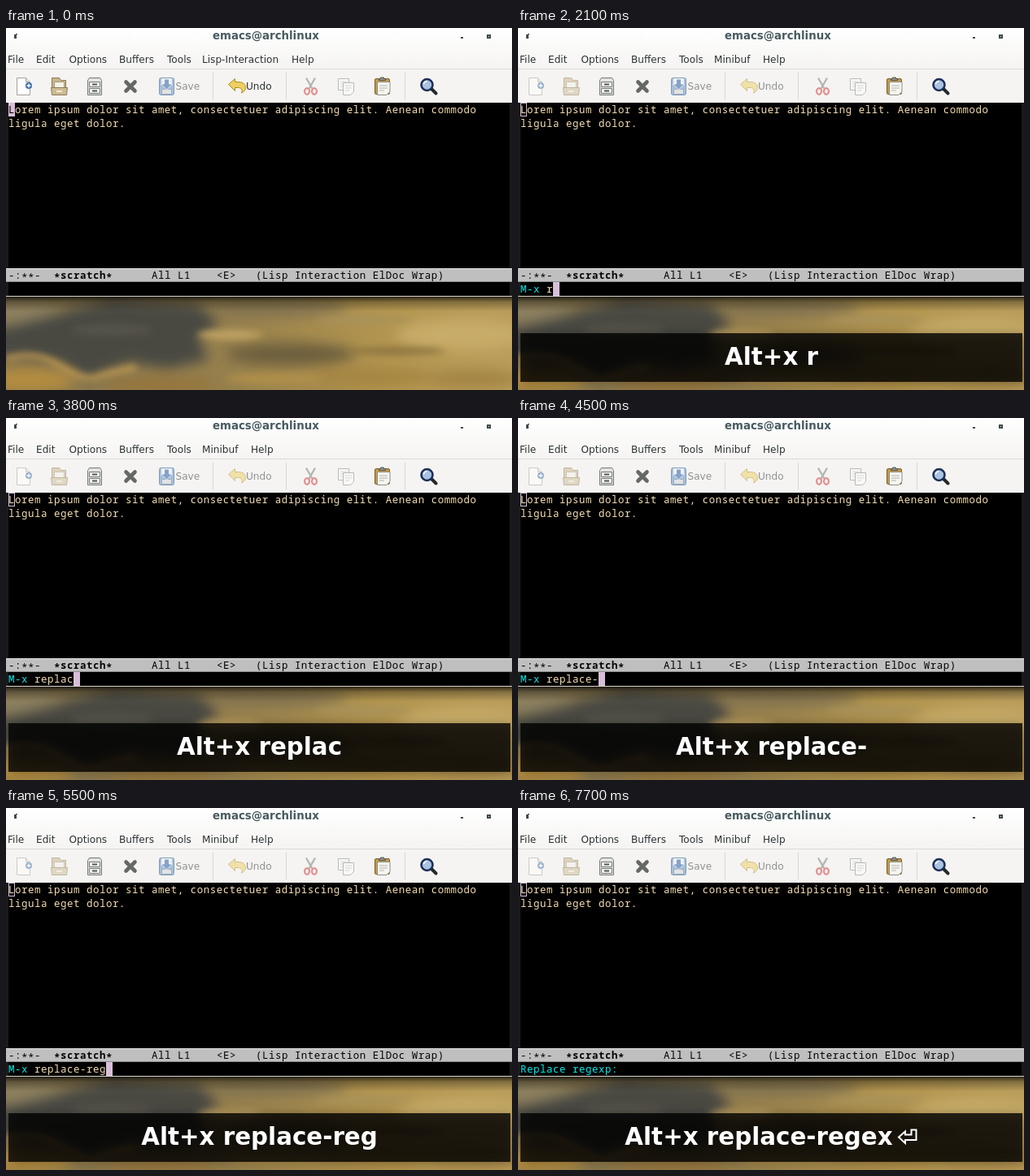
Animation of 622 by 446 pixels, one loop 8 s. Source, as an HTML page:

```html
<!DOCTYPE html>
<html lang="en">
<head>
<meta charset="utf-8">
<title>Replace regexp</title>
<style>
html, body { margin: 0; width: 100%; height: 100%; overflow: hidden; background: #000; }
svg { display: block; width: 622px; height: 446px; }
text { white-space: pre; }
.title { font: bold 13.333px "DejaVu Sans", sans-serif; fill: #465b60; }
.ui { font: 12.1px "DejaVu Sans", sans-serif; fill: #2b3133; }
.mono { font: 12.4px "Noto Sans Mono", monospace; letter-spacing: .56px; fill: #f5deb3; }
.mode { fill: #000; }
.bold { font-weight: bold; }
.prompt { fill: #0ee; }
.big { font: bold 29.333px "DejaVu Sans", sans-serif; fill: #fff; }
.off { opacity: .5; }
.busy .dim { opacity: .5; }
.busy .idle, svg:not(.busy) .live { display: none; }
</style>
</head>
<body>
<svg id="stage" viewBox="0 0 622 446">
  <defs>
    <linearGradient id="bar" x2="0" y2="1">
      <stop offset="0" stop-color="#fff"/><stop offset="1" stop-color="#f5f4f2"/>
    </linearGradient>
    <linearGradient id="dusk">
      <stop offset="0" stop-color="#85744e"/><stop offset=".45" stop-color="#96804d"/>
      <stop offset=".75" stop-color="#b3954f"/><stop offset="1" stop-color="#b99d5a"/>
    </linearGradient>
    <linearGradient id="shade" x2="0" y2="1">
      <stop offset="0" stop-color="#000" stop-opacity=".75"/>
      <stop offset=".35" stop-color="#000" stop-opacity=".3"/>
      <stop offset="1" stop-color="#000" stop-opacity="0"/>
    </linearGradient>
    <filter id="soft" x="-30%" y="-60%" width="160%" height="220%"><feGaussianBlur stdDeviation="8"/></filter>
    <filter id="wisp" x="-30%" y="-80%" width="160%" height="260%"><feGaussianBlur stdDeviation="4"/></filter>
    <clipPath id="view"><rect y="331" width="622" height="115"/></clipPath>
  </defs>

  <!-- sky -->
  <g clip-path="url(#view)">
    <rect y="331" width="622" height="115" fill="url(#dusk)"/>
    <g filter="url(#soft)">
      <ellipse cx="20" cy="352" rx="50" ry="12" fill="#8d8160"/>
      <path d="M-20 372L60 352L130 334L240 340L262 366L236 384L250 408L200 420L150 412L100 432L66 412L-20 404Z" fill="#4a4843"/>
      <ellipse cx="25" cy="434" rx="60" ry="16" fill="#b28c41"/>
      <ellipse cx="190" cy="440" rx="70" ry="9" fill="#96743a"/>
      <ellipse cx="350" cy="402" rx="80" ry="14" fill="#6d5e3d"/>
      <ellipse cx="330" cy="346" rx="90" ry="10" fill="#807150"/>
      <ellipse cx="450" cy="430" rx="80" ry="10" fill="#a58440"/>
      <ellipse cx="560" cy="378" rx="80" ry="20" fill="#c7ab68"/>
      <ellipse cx="575" cy="432" rx="60" ry="10" fill="#a18242"/>
    </g>
    <g filter="url(#wisp)">
      <path d="M0 408Q36 396 66 416T112 430T160 418" fill="none" stroke="#c29d52" stroke-width="6"/>
      <ellipse cx="275" cy="378" rx="40" ry="6" fill="#c0a262"/>
      <ellipse cx="440" cy="360" rx="60" ry="5" fill="#a8925a"/>
      <ellipse cx="330" cy="432" rx="60" ry="6" fill="#b18f48"/>
      <ellipse cx="480" cy="398" rx="60" ry="5" fill="#8d743f"/>
      <ellipse cx="130" cy="372" rx="50" ry="7" fill="#55524a"/>
    </g>
    <rect y="331" width="622" height="18" fill="url(#shade)"/>
  </g>

  <!-- window -->
  <rect width="622" height="92" fill="#f5f4f2"/>
  <rect width="622" height="50" fill="url(#bar)"/>
  <rect y="50" width="622" height="1" fill="#dddad6"/>
  <path d="M10 8h3v5h-3zM12 7h2v1h-2zM559 11h3v2h-3zM591 8h5v5h-5z" fill="#3c4a4d"/>
  <rect x="593" y="10" width="1" height="1" fill="#fff"/>
  <text class="title" x="254" y="14">emacs@archlinux</text>
  <g class="ui">
    <text x="2" y="43">File</text>
    <text x="37" y="43">Edit</text>
    <text x="77.5" y="43">Options</text>
    <text x="139" y="43">Buffers</text>
    <text x="198" y="43">Tools</text>
    <g class="idle"><text x="241" y="43">Lisp-Interaction</text><text x="351" y="43">Help</text></g>
    <g class="live"><text x="241" y="43">Minibuf</text><text x="301" y="43">Help</text></g>
    <text class="off" x="208.5" y="76">Save</text>
    <text class="dim" x="295" y="76">Undo</text>
  </g>
  <path d="M254.5 55v33M344.5 55v33M490.5 55v33" stroke="#d9d6d2"/>

  <!-- new -->
  <g class="dim">
    <path d="M13.5 61.5h11l5 5v16h-16z" fill="#fff" stroke="#a2a29e"/>
    <path d="M24.5 61.5v5h5" fill="#e4e4e0" stroke="#a2a29e"/>
    <circle cx="28" cy="71" r="4" fill="#3b6ea5"/>
    <path d="M28 68.5v5M25.5 71h5" stroke="#fff" stroke-width="1.4"/>
  </g>
  <!-- open -->
  <g class="dim">
    <path d="M56.5 61.5h9l2 3h6v10h-17z" fill="#c8b48c" stroke="#8d7a55"/>
    <path d="M59.500 66.500h12v8h-12z" fill="#f4f1e8" stroke="#a89a7c"/>
    <path d="M55.5 73.500h20l-1 9h-18z" fill="#cdbb96" stroke="#8d7a55"/>
    <path d="M62 78h7" stroke="#f4ead0" stroke-width="2"/>
  </g>
  <!-- cabinet -->
  <g stroke="#777a75" fill="#e3e3df">
    <path d="M102.500 61.500h13l2 3v18h-17v-18z"/>
    <path d="M102.500 66.500h13v6h-13zM102.500 74.500h13v6h-13z" fill="#f2f2ee"/>
    <path d="M106 69.500h6M106 77.500h6" stroke="#555853" stroke-width="2"/>
  </g>
  <!-- close -->
  <path d="M147.500 66.500l11 11M158.500 66.500l-11 11" stroke="#656964" stroke-width="4.6" stroke-linecap="round"/>
  <!-- save -->
  <g opacity=".65">
    <rect x="188.500" y="61.500" width="18" height="21" rx="2" fill="#7fa3cc" stroke="#3f6ca3"/>
    <path d="M191 62h13v8h-13z" fill="#eef0f0"/>
    <path d="M191.500 75.500h12v6h-12z" fill="#d9dcdc" stroke="#6c87a6"/>
    <path d="M194.500 63v6h-4l7 7 7-7h-4v-6z" fill="#4a79b4" stroke="#fff" stroke-width=".8"/>
  </g>
  <!-- undo -->
  <path class="dim" d="M273.500 69.500l8-7v4h4c6 0 9 3 9 7 0 3-2 5-5 6.500 2-4-1-6.500-4-6.500h-4v4z" fill="#edcf62" stroke="#b08a1c"/>
  <!-- cut -->
  <g class="off" fill="none">
    <path d="M369 61.500l8 14M380 61.500l-8 14" stroke="#777b78" stroke-width="2.400"/>
    <ellipse cx="370" cy="78" rx="3" ry="3.800" stroke="#d33030" stroke-width="2.200"/>
    <ellipse cx="379" cy="78" rx="3" ry="3.800" stroke="#d33030" stroke-width="2.200"/>
  </g>
  <!-- copy -->
  <g class="off" fill="#fff" stroke="#7d807b">
    <path d="M408.500 62.500h13v14h-13z"/>
    <path d="M411 66h8M411 69h8M411 72h5" stroke="#b5b7b3"/>
    <path d="M414.500 67.500h13v11l-4 4h-9z"/>
    <path d="M417 71h8M417 74h8M417 77h5" stroke="#b5b7b3"/>
  </g>
  <!-- paste -->
  <rect x="453.500" y="62.500" width="18" height="19" rx="1.500" fill="#c59a4a" stroke="#7d5a1e"/>
  <path d="M456.500 66.500h15.500v12l-4 4h-11.500z" fill="#f6f6f2" stroke="#8b8d88"/>
  <path d="M459 71h10M459 74h10M459 77h6" stroke="#b0b2ae"/>
  <path d="M458.500 64.500v-2h2v-1.500h4v1.500h2v2z" fill="#8f928d" stroke="#555853"/>
  <!-- search -->
  <path d="M523 75l5.500 5.500" stroke="#26292b" stroke-width="4" stroke-linecap="round"/>
  <circle cx="517.500" cy="70" r="7" fill="#a9c3e2" stroke="#1e2f58" stroke-width="2.600"/>
  <path d="M513.500 69a4.500 4.500 0 0 1 4-3.500" fill="none" stroke="#fff" stroke-width="1.600"/>

  <!-- editor -->
  <rect y="92" width="622" height="239" fill="#1a1a1a"/>
  <rect x="3" y="92" width="616" height="238" fill="#000"/>
  <rect id="point" x="3" y="92" width="8" height="17" fill="#d8bfd8"/>
  <rect class="live" x="3.500" y="92.500" width="7" height="16" fill="none" stroke="#d8bfd8"/>
  <text class="mono" x="3" y="105"><tspan id="first">L</tspan>orem ipsum dolor sit amet, consectetuer adipiscing elit. Aenean commodo</text>
  <text class="mono" x="3" y="122">ligula eget dolor.</text>
  <rect y="296" width="622" height="17" fill="#bfbfbf"/>
  <rect y="296" width="622" height="1" fill="#e4e4e4"/>
  <rect y="312" width="622" height="1" fill="#8c8c8c"/>
  <text class="mono mode" x="3" y="309">-:<tspan dy="2.500">**</tspan><tspan dy="-2.500">-</tspan></text>
  <text class="mono mode bold" x="59" y="309"><tspan dy="2.500">*</tspan><tspan dy="-2.500">scratch</tspan><tspan dy="2.500">*</tspan></text>
  <text class="mono mode" x="179" y="309">All L1    &lt;E&gt;   (Lisp Interaction ElDoc Wrap)</text>
  <rect id="caret" y="313" width="8" height="17" fill="#d8bfd8"/>
  <text class="mono" x="3" y="326"><tspan class="prompt" id="prompt"></tspan><tspan id="input"></tspan></text>
  <rect y="330" width="622" height="1" fill="#d6d4d0"/>

  <!-- key display -->
  <g class="live">
    <rect x="3" y="376" width="617" height="60" fill="#000" fill-opacity=".8" style="filter:drop-shadow(3px 1px 7px rgba(0,0,0,.35))"/>
    <text class="big" id="keys" y="415" text-anchor="middle"></text>
    <rect id="line" y="416" height="2" fill="#fff"/>
    <path id="enter" d="M468 405.500l8-7v4h7.500v-6h6v12.500h-13.500v4z" fill="none" stroke="#fff" stroke-width="2"/>
  </g>
</svg>
<script>
const LOOP = 8000, START = 1100, ENTER = 7200, MID = 311.5, COL = 8;
// time, typed text, how long its underline stays, lead of the echo
const STROKES = [
  [1900, 'r', 200], [2200, 'e', 100], [3000, 'pl', 200], [3400, 'a', 100],
  [3600, 'c', 200], [4000, 'e', 100], [4300, '-', 200], [4700, 'r', 200],
  [5000, 'e', 200], [5300, 'g', 200], [5600, 'e', 100], [6100, 'x', 200, 100]
];
const HIDDEN = [[1600, 1900], [6600, 7100], [7700, LOOP]];

const $ = id => document.getElementById(id);
const show = (el, on) => el.setAttribute('visibility', on ? 'inherit' : 'hidden');
const within = (t, a, b) => t >= a && t < b;
const put = (el, s) => { if (el.textContent !== s) el.textContent = s; };

function drawEcho(t) {
  const done = t >= ENTER;
  const prompt = done ? 'Replace regexp: ' : 'M-x ';
  const typed = STROKES.filter(k => t >= k[0] - (k[3] || 0)).map(k => k[1]).join('');
  const input = done ? '' : typed;
  put($('prompt'), t < START ? '' : prompt);
  put($('input'), t < START ? '' : input);
  $('caret').setAttribute('x', 3 + COL * (prompt.length + input.length));
  show($('caret'), t >= START && !HIDDEN.some(([a, b]) => within(t, a, b)));
}

function drawKeys(t) {
  const past = STROKES.filter(k => t >= k[0]);
  const last = past[past.length - 1];
  const done = t >= ENTER;
  const text = 'Alt+x' + (last ? ' ' + past.map(k => k[1]).join('') : '');
  const keys = $('keys'), line = $('line');
  put(keys, text);
  keys.setAttribute('x', done ? MID - 15.5 : MID);
  show($('enter'), done);

  const lit = done ? t < ENTER + 100 : last ? t < last[0] + last[2] : t < START + 100;
  show(line, lit);
  if (!lit) return;
  const end = text.length - 1;
  const left = done ? 466 : keys.getStartPositionOfChar(last ? end : 0).x;
  const right = done ? 491 : keys.getEndPositionOfChar(end).x;
  line.setAttribute('x', left);
  line.setAttribute('width', right - left);
}

function draw(now) {
  const t = now % LOOP;
  const busy = t >= START;
  const solid = !busy && !within(t, 200, 700);
  $('stage').classList.toggle('busy', busy);
  show($('point'), solid);
  $('first').style.fill = solid ? '#000' : '';
  drawEcho(t);
  if (busy) drawKeys(t);
}

function tick() {
  draw(performance.now());
  requestAnimationFrame(tick);
}
tick();
</script>
</body>
</html>
```
